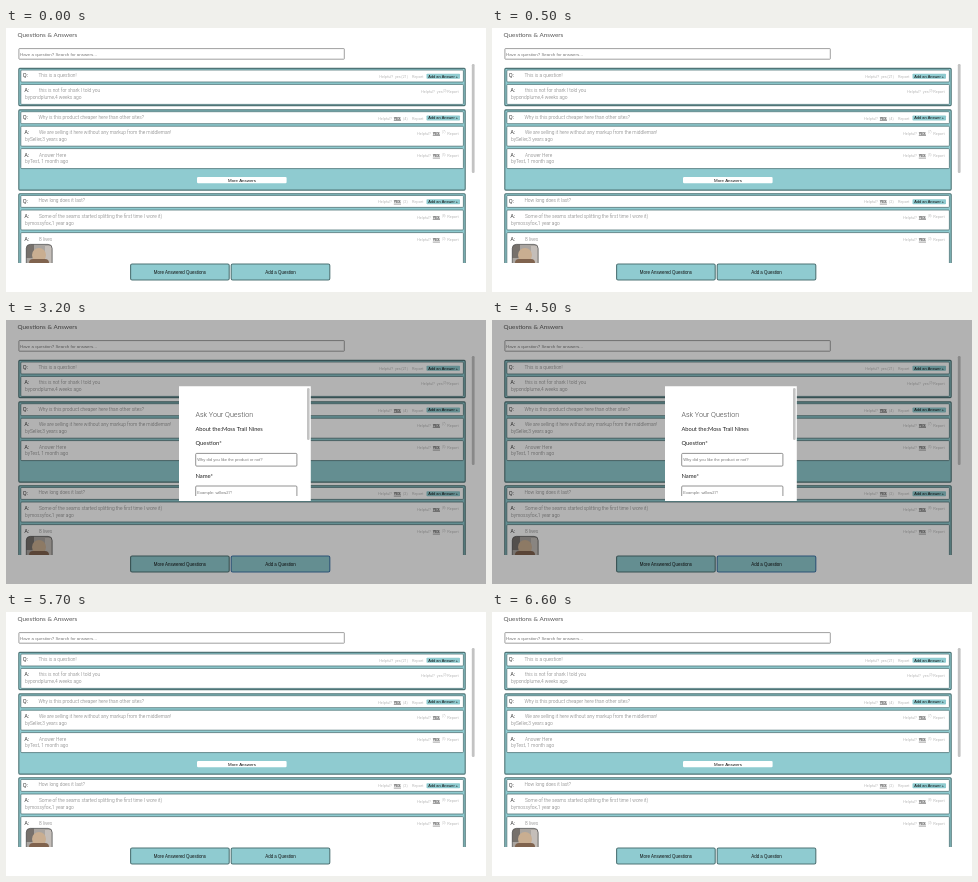
An HTML page with a canvas for the animation above (6700 ms loop, 480 by 264 pixels).

```html
<!DOCTYPE html>
<html lang="en">
<head>
<meta charset="utf-8">
<title>Questions and answers</title>
<style>
  html, body { margin: 0; width: 100%; height: 100%; overflow: hidden; background: #fff; }
  canvas { display: block; width: 480px; height: 264px; }
</style>
</head>
<body>
<canvas id="stage"></canvas>
<script>
const W = 480, H = 264, LOOP = 6700;
const FOCUS_AT = 3000, OPEN_AT = 3200, CLOSE_AT = 5700;
const TEAL = '#8fcbd0', EDGE = '#4f7476';
const THIN = 'Roboto, sans-serif', UI = '"Liberation Sans", Arial, sans-serif', HEAD = 'Lato, sans-serif';

const canvas = document.getElementById('stage');
const ctx = canvas.getContext('2d');
const ratio = window.devicePixelRatio || 1;
canvas.width = W * ratio;
canvas.height = H * ratio;
ctx.scale(ratio, ratio);

function box(x, y, w, h, fill, stroke, radius = 0, line = 1) {
  ctx.beginPath();
  ctx.roundRect(x, y, w, h, radius);
  if (fill) { ctx.fillStyle = fill; ctx.fill(); }
  if (stroke) { ctx.strokeStyle = stroke; ctx.lineWidth = line; ctx.stroke(); }
}

function text(str, x, y, size, color, family = THIN, weight = 300, align = 'left') {
  ctx.font = `${weight} ${size}px ${family}`;
  ctx.fillStyle = color;
  ctx.textAlign = align;
  ctx.fillText(str, x, y);
}

function clipped(x, y, w, h, draw) {
  ctx.save();
  ctx.beginPath();
  ctx.rect(x, y, w, h);
  ctx.clip();
  draw();
  ctx.restore();
}

function card(y, h) {
  box(12.8, y, 446.4, h, TEAL, EDGE, 1, 1.1);
}

function row(y, h) {
  box(14.8, y, 442.6, h, '#fff', EDGE, 1, 0.8);
}

function votes(x, y, count, voted) {
  const faint = '#999';
  text('Helpful?', x, y, 3.9, faint);
  text(voted ? 'YES' : 'yes', x + 15.8, y, 3.9, voted ? '#222' : faint, THIN, voted ? 500 : 300);
  if (voted) box(x + 15.8, y + 0.6, 7.2, 0.5, '#444');
  return [`(${count})`, x + (voted ? 25 : 22)];
}

function question(y, str, count, voted) {
  row(y, 12);
  text('Q:', 16.8, y + 7.2, 4.9, '#222', UI, 400);
  text(str, 32.4, y + 6.9, 4.85, '#777');
  const [label, x] = votes(voted ? 372 : 373.2, y + 7.8, count, voted);
  text(label, x, y + 7.8, 3.9, '#999');
  text('Report', 406, y + 7.8, 3.9, '#999');
  box(420.5, y + 3.8, 33.5, 5, TEAL, null, 0.8);
  text('Add an Answer +', 437.2, y + 7.7, 3.9, '#111', UI, 400, 'center');
}

function answer(y, str, author, count, voted, h = 20) {
  row(y, h);
  text('A:', 18.6, y + 8, 4.9, '#222', UI, 400);
  text(str, 33, y + 8, 4.85, '#777');
  text(author, 19, y + 14.6, 4.85, '#777');
  const [label, x] = votes(voted ? 411 : 415, y + 8.6, count, voted);
  text(label, x, y + 7.2, 3, '#999');
  text('Report', 441.2, y + 8.4, 3.9, '#999');
}

function photo() {
  ctx.save();
  ctx.beginPath();
  ctx.roundRect(20.3, 216.4, 25.8, 24, 4);
  ctx.clip();
  box(20, 216, 27, 25, '#aaa5a0');
  box(20, 216, 8, 14, '#77716c');
  box(39, 218, 8, 18, '#c4beb9');
  ctx.beginPath();
  ctx.ellipse(33, 227, 7, 7, 0, 0, Math.PI * 2);
  ctx.fillStyle = '#c9ae91';
  ctx.fill();
  box(23, 231, 20, 9, '#80634e', null, 4);
  ctx.restore();
  box(20.3, 216.4, 25.8, 24, null, '#555', 4, 0.8);
}

function list() {
  card(40.4, 37.2);
  question(42, 'This is a question!', 21, false);
  answer(56.4, 'this is not for shark I told you', 'bypondplume,4 weeks ago', 3, false);

  card(81.9, 80.2);
  question(83.7, 'Why is this product cheaper here than other sites?', 4, true);
  answer(98.2, 'We are selling it here without any markup from the middleman!', 'bySeller,3 years ago', 7, true);
  answer(120.6, 'Answer Here', 'byTest, 1 month ago', 5, true);
  box(191, 148.9, 89.6, 6.4, '#fff', null, 1.2);
  text('More Answers', 236, 153.6, 4.4, '#111', UI, 400, 'center');

  card(165.8, 90);
  question(167.4, 'How long does it last?', 2, true);
  answer(182, 'Some of the seams started splitting the first time I wore it)', 'bymossyfox,1 year ago', 8, true);
  answer(204.6, '8 lives', '', 3, true, 50);
  photo();
}

function button(x, label, focused) {
  box(x, 236, 98.6, 16, TEAL, focused ? '#3f77a8' : EDGE, 1.5, 1.1);
  text(label, x + 49.3, 245.7, 4.45, '#111', UI, 400, 'center');
}

function page(focused) {
  box(0, 0, W, H, '#fff');
  text('Questions & Answers', 11.6, 9.2, 6.3, '#555', HEAD, 400);
  box(12.9, 20.6, 325.4, 10.6, '#fff', '#888', 0.5, 0.8);
  text('Have a question? Search for answers...', 14, 27.5, 4.4, '#777', UI, 400);
  clipped(0, 36, W, 199, list);
  box(465.8, 36, 2.8, 109, '#c3c3c3', null, 1.2);
  button(124.6, 'More Answered Questions', false);
  button(225.2, 'Add a Question', focused);
}

function field(y, label, hint) {
  text(label, 189.4, y - 8, 5.9, '#222', HEAD, 400);
  box(189.7, y, 101.2, 12.7, '#fff', '#777', 1, 0.8);
  text(hint, 191.2, y + 7.9, 4.1, '#777', UI, 400);
}

function modal() {
  box(0, 0, W, H, 'rgba(0,0,0,0.3)');
  box(173, 66.3, 131.8, 114.7, '#fff');
  clipped(173, 66, 132, 110, () => {
    text('Ask Your Question', 189.4, 97.4, 7.2, '#444');
    text('About the:Moss Trail Nines', 189.4, 111.3, 5.7, '#222', HEAD, 400);
    field(133.4, 'Question*', 'Why did you like the product or not?');
    field(166, 'Name*', 'Example: willow27!');
  });
  box(301, 68, 2.6, 52, '#c3c3c3', null, 1.2);
}

function frame(now) {
  const t = now % LOOP;
  page(t >= FOCUS_AT && t < CLOSE_AT);
  if (t >= OPEN_AT && t < CLOSE_AT) modal();
  requestAnimationFrame(frame);
}
requestAnimationFrame(frame);
</script>
</body>
</html>
```
